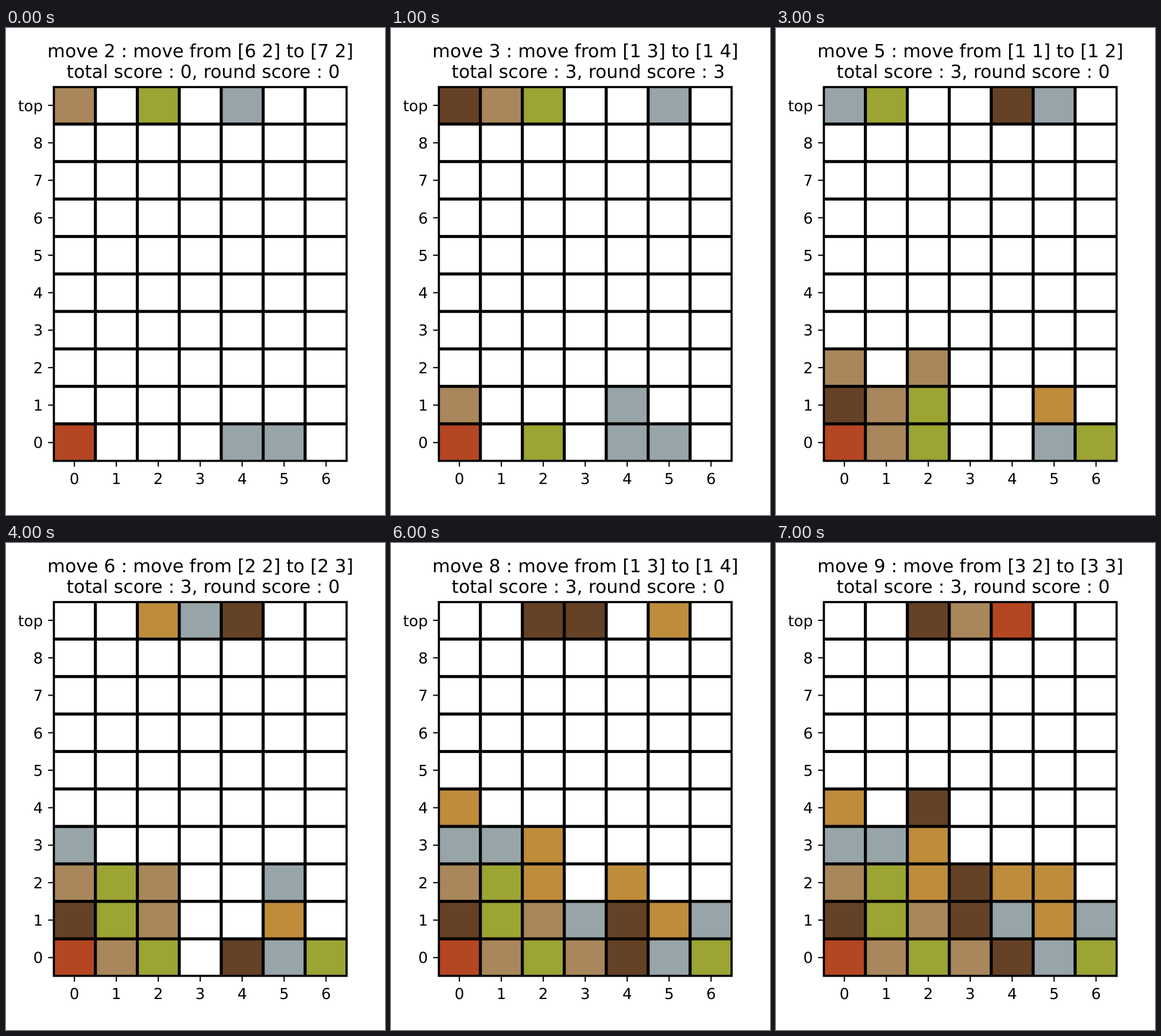
Write an HTML page with a canvas that moves like this. It is 660 px wide and 849 px high and loops after 8000 ms.

```html
<!DOCTYPE html>
<html lang="en">
<head>
<meta charset="utf-8">
<title>Block puzzle replay</title>
<style>
  html, body { margin: 0; width: 100%; height: 100%; overflow: hidden; background: #fff; }
  canvas { display: block; }
</style>
</head>
<body>
<canvas id="stage" width="660" height="849"></canvas>
<script>
const ctx = document.getElementById('stage').getContext('2d');
const COLS = 7, ROWS = 9, STEP_MS = 1000, EMPTY = '.';
const BOARD = { left: 82.6, top: 102.2, right: 593.9, bottom: 755.4 };
const CELL_W = (BOARD.right - BOARD.left) / COLS;
const CELL_H = (BOARD.bottom - BOARD.top) / (ROWS + 1);
const PT = 2.635; // pixels per point
const COLORS = {
  T: '#a9865b', G: '#9ca433', S: '#97a5a8',
  O: '#be8c3b', D: '#654126', R: '#b54622'
};

// Incoming blocks per round, and the two cells [row, col] that are swapped.
const ROUNDS = [
  { top: 'T.G.S..', from: [6, 2], to: [7, 2] },
  { top: 'DTG..S.', from: [1, 3], to: [1, 4] },
  { top: 'T.T..OG', from: [1, 0], to: [1, 1] },
  { top: 'SG..DS.', from: [1, 1], to: [1, 2] },
  { top: '..OSD..', from: [2, 2], to: [2, 3] },
  { top: 'OSO.O..', from: [2, 5], to: [2, 6] },
  { top: '..DD.O.', from: [1, 3], to: [1, 4] },
  { top: '..DTR..', from: [3, 2], to: [3, 3] }
];

// Columns are stacks from the bottom up.
const settle = cols => cols.map(col => col.filter(c => c && c !== EMPTY));

function swap(cols, [r1, c1], [r2, c2]) {
  const next = cols.map(col => Array.from({ length: ROWS }, (_, r) => col[r] || EMPTY));
  [next[c1][r1], next[c2][r2]] = [next[c2][r2], next[c1][r1]];
  return settle(next);
}

function clearRuns(cols) {
  const hits = new Set();
  const at = (r, c) => (cols[c] || [])[r];
  for (let c = 0; c < COLS; c++) {
    for (let r = 0; r < ROWS; r++) {
      for (const [dr, dc] of [[0, 1], [1, 0]]) {
        const run = [0, 1, 2].map(k => [r + k * dr, c + k * dc]);
        if (at(r, c) && run.every(([y, x]) => at(y, x) === at(r, c))) {
          run.forEach(([y, x]) => hits.add(y * COLS + x));
        }
      }
    }
  }
  const left = cols.map((col, c) => col.filter((_, r) => !hits.has(r * COLS + c)));
  return { cols: left, score: hits.size };
}

function play() {
  let cols = settle([...'R...SS.'].map(c => [c]));
  let total = 0;
  return ROUNDS.map(({ top, from, to }, i) => {
    const shown = cols;
    const result = clearRuns(swap(cols, from, to));
    total += result.score;
    cols = settle(result.cols.map((col, c) => [...col, top[c]]));
    return {
      cols: shown, top,
      title: `move ${i + 2} : move from [${from.join(' ')}] to [${to.join(' ')}]`,
      scores: `total score : ${total}, round score : ${result.score}`
    };
  });
}

const colX = c => BOARD.left + c * CELL_W;
const rowY = r => BOARD.bottom - (r + 1) * CELL_H;

function fillCell(r, c, kind) {
  if (!COLORS[kind]) return;
  ctx.fillStyle = COLORS[kind];
  ctx.fillRect(colX(c), rowY(r), CELL_W, CELL_H);
}

function text(str, x, y, points, align) {
  ctx.font = `${points * PT}px "DejaVu Sans", sans-serif`;
  ctx.textAlign = align;
  ctx.fillText(str, x, y);
}

function drawGrid() {
  const w = BOARD.right - BOARD.left, h = BOARD.bottom - BOARD.top;
  const line = 2 * PT, spine = 0.8 * PT, tick = 3.5 * PT;
  ctx.fillStyle = ctx.strokeStyle = '#000';
  ctx.save();
  ctx.beginPath();
  ctx.rect(BOARD.left, BOARD.top, w, h);
  ctx.clip();
  for (let c = 0; c <= COLS; c++) ctx.fillRect(colX(c) - line / 2, BOARD.top, line, h);
  for (let r = -1; r <= ROWS; r++) ctx.fillRect(BOARD.left, rowY(r) - line / 2, w, line);
  ctx.restore();
  ctx.lineWidth = spine;
  ctx.strokeRect(BOARD.left, BOARD.top, w, h);

  for (let c = 0; c < COLS; c++) {
    const x = colX(c + 0.5);
    ctx.fillRect(x - spine / 2, BOARD.bottom, spine, tick);
    text(c, x, 794.8, 10, 'center');
  }
  for (let r = 0; r <= ROWS; r++) {
    const y = rowY(r - 0.5);
    ctx.fillRect(BOARD.left - tick, y - spine / 2, tick, spine);
    text(r === ROWS ? 'top' : r, BOARD.left - 2 * tick, y + 9.7, 10, 'right');
  }
}

function draw(round) {
  ctx.fillStyle = '#fff';
  ctx.fillRect(0, 0, 660, 849);
  round.cols.forEach((col, c) => col.forEach((kind, r) => fillCell(r, c, kind)));
  [...round.top].forEach((kind, c) => fillCell(ROWS, c, kind));
  drawGrid();
  text(round.title, 338.5, 51.4, 12, 'center');
  text(round.scores, 343.4, 86.6, 12, 'center');
}

const rounds = play();
ctx.textRendering = 'geometricPrecision';
const start = performance.now();

function frame() {
  const step = Math.floor((performance.now() - start) / STEP_MS);
  draw(rounds[step % rounds.length]);
  requestAnimationFrame(frame);
}
frame();
</script>
</body>
</html>
```
